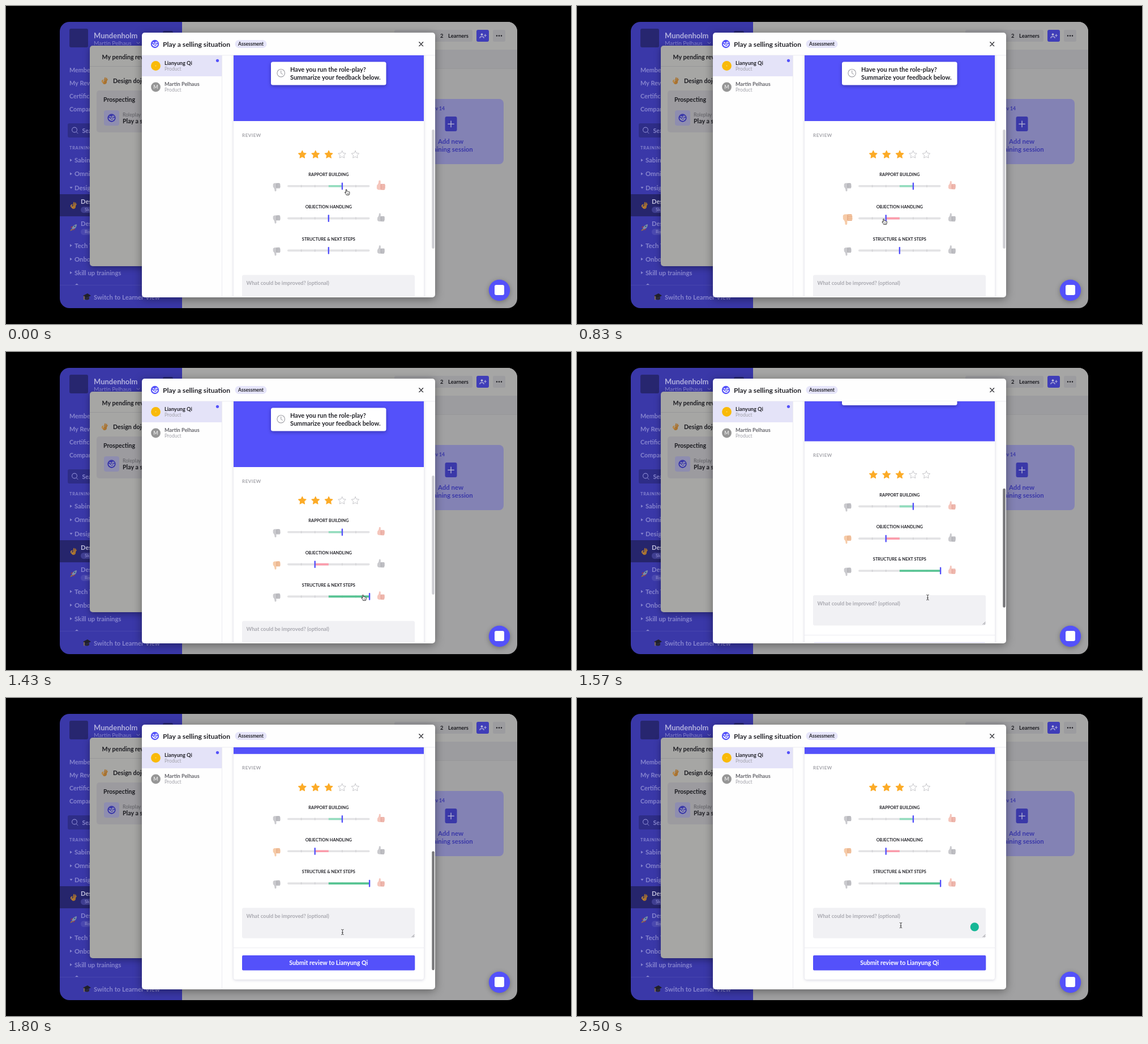
Recreate the animation shown at these times as an HTML page with a canvas. Size 998 by 561 pixels, loop 2530 ms.

```html
<!DOCTYPE html>
<html lang="en">
<head>
<meta charset="utf-8">
<title>Role-play review</title>
<style>
  html, body { margin: 0; width: 100%; height: 100%; overflow: hidden; background: #000; }
  canvas { display: block; }
</style>
</head>
<body>
<canvas id="stage" width="998" height="561"></canvas>
<script>
const ctx = document.getElementById('stage').getContext('2d');
const LOOP = 2530;
const BLUE = '#5451fa', INK = '#232329', DIM_BLUE = '#3a38a8', DIM_INK = '#1b1b20';
const LEARNER = 'Lianyung Qi', COACH = 'Martin Pelhaus', COMPANY = 'Mundenholm';

const clamp = v => Math.max(0, Math.min(1, v));
const smooth = v => (1 - Math.cos(Math.PI * clamp(v))) / 2;

function box(x, y, w, h, color, r = 0) {
  ctx.fillStyle = color;
  ctx.beginPath();
  ctx.roundRect(x, y, w, h, r);
  ctx.fill();
}

function disc(x, y, r, color) {
  ctx.fillStyle = color;
  ctx.beginPath();
  ctx.arc(x, y, r, 0, Math.PI * 2);
  ctx.fill();
}

// y is the middle of the capital letters
function text(str, x, y, size, color, { weight = 700, align = 'left', spacing = 0 } = {}) {
  ctx.font = `${weight} ${size}px Lato, sans-serif`;
  ctx.textAlign = align;
  ctx.letterSpacing = spacing + 'px';
  ctx.fillStyle = color;
  ctx.fillText(str, x, y + size * 0.36);
}

function stroke(d, color, width = 1) {
  ctx.strokeStyle = color;
  ctx.lineWidth = width;
  ctx.lineCap = ctx.lineJoin = 'round';
  ctx.stroke(new Path2D(d));
}

function shape(d, color) {
  ctx.fillStyle = color;
  ctx.fill(new Path2D(d));
}

function at(x, y, draw, scale = 1) {
  ctx.save();
  ctx.translate(x, y);
  ctx.scale(scale, scale);
  draw();
  ctx.restore();
}

function shadowed(blur, color, dy, draw) {
  ctx.save();
  ctx.shadowBlur = blur;
  ctx.shadowColor = color;
  ctx.shadowOffsetY = dy;
  draw();
  ctx.restore();
}

function playIcon(x, y, color, mark) {
  disc(x, y, 7.2, color);
  at(x, y, () => {
    stroke('M-4.3 .5Q-2.5 5 2 3.6Q3.8 2.8 4.4 .6', mark, 1.7);
    stroke('M-3.2 -2.6L-1.4 -1.6M1 -2.2Q2.4 -4 4 -2.6', mark, 1.6);
    stroke('M-1 1L2.5 0', mark, 1.5);
  });
}

function okHand(x, y) {
  at(x, y, () => {
    stroke('M0 -1L1 -5.4M2 -1L3.6 -4.6M3.2 .4L5 -2.6', '#a8722f', 1.8);
    shape('M-2 1L4 -1.4L4 3Q3 6 0 6Q-3 6 -3 3Z', '#a8722f');
    stroke('M-1 3A2.2 2.2 0 1 1 -2.6 -1.2', '#b98238', 1.8);
  });
}

function rocket(x, y) {
  at(x, y, () => {
    shape('M6 -6Q0 -5 -3 1L0 4Q6 0 6 -6Z', '#7d8ea8');
    shape('M-1 -3L-5 -1L-3 1ZM3 1L1 5L-1 3Z', '#983848');
    shape('M-3 2L-6 6L-1 4Z', '#aa7930');
    disc(2.3, -2.2, 1.3, '#2e5a95');
  });
}

function gradCap(x, y) {
  at(x, y, () => {
    shape('M-7 -2L1 -6L7 -2L-1 2Z', '#20202b');
    shape('M-4 0L-1 2L4 0L4 4Q0 7 -4 4Z', '#282833');
    stroke('M-5 -1L-5 5', '#a38334', 1.2);
  });
}

function drawSidebar() {
  const pale = '#8785cf', bright = '#b2b1dd';
  box(95, 28, 216, 505, DIM_BLUE);
  box(112, 40, 33, 33, '#27266f', 3);
  text(COMPANY, 155, 52, 13, bright);
  text(COACH, 155, 65, 10.1, pale, { weight: 400 });
  stroke('M231 64L233.5 66.5L236 64', pale);
  box(277, 44, 18, 18, '#27266f', 3);

  ['Members', 'My Reviews', 'Certificates', 'Company'].forEach((s, i) =>
    text(s, 112, 113.5 + i * 23, 10.8, pale));

  box(109, 207, 186, 25, '#2e2d87', 3);
  ctx.strokeStyle = pale;
  ctx.lineWidth = 1.1;
  ctx.beginPath();
  ctx.arc(121, 218.5, 4.4, 0, 7);
  ctx.stroke();
  stroke('M124.3 222L127 224.8', pale);
  text('Search', 134.5, 220, 10.6, pale);
  text('TRAININGS', 112, 250, 7.4, pale, { spacing: 0.7 });

  box(95, 332, 216, 39, '#26256c');
  const rows = [['Sabine', 272], ['Omnichannel', 296], ['Design', 320.5],
    ['Tech Talks', 422.5], ['Onboarding', 446.5], ['Skill up trainings', 470.5]];
  for (const [label, y] of rows) {
    shape(label === 'Design'
      ? `M112.5 ${y - 1.5}h5l-2.5 3.5z`
      : `M113 ${y - 2.5}v5l3.8 -2.5z`, pale);
    text(label, 121, y, 11.3, pale);
  }
  okHand(119, 352);
  text('Design dojo', 132, 345, 11.2, '#c2c1de');
  box(132, 354, 40, 11, '#403f92', 5.5);
  text('Skills', 139, 359.5, 8, pale);
  rocket(119, 391);
  text('Design sprint', 132, 384, 11.2, pale);
  box(132, 393, 46, 11, '#4b49b0', 5.5);
  text('Role', 139, 398.5, 8, pale);

  shape('M122 492L125 489.5L128 492Z', pale);
  box(95, 492, 216, 1, '#4745ae');
  gradCap(143, 513);
  text('Switch to Learner View', 155, 513.5, 11.3, pale);
}

function drawDesk() {
  box(311, 28, 592, 505, '#a1a1a2');
  box(311, 28, 592, 49, '#a6a6a5');
  box(311, 77, 592, 33, '#9c9c9f');
  box(311, 110, 592, 1, '#979799');
  box(686, 42, 138, 21, '#9c9c9f', 3);
  text('2', 767, 53, 9.3, DIM_INK);
  text('Learners', 781, 53, 9.4, DIM_INK);
  box(831, 42, 22, 21, '#3f3db8', 3);
  disc(840.5, 50.2, 1.9, '#b9b8dc');
  stroke('M837 56.5Q837 53.8 840.5 53.8Q844 53.8 844 56.5', '#b9b8dc', 1.2);
  stroke('M846.5 50v4M844.5 52h4', '#b9b8dc');
  box(860, 42, 22, 21, '#9c9c9f', 3);
  [867, 871, 875].forEach(x => disc(x, 52.5, 1.2, DIM_INK));

  box(692, 164, 187, 115, '#8382b4', 8);
  text('Nov 14', 775, 181, 8.6, DIM_BLUE, { align: 'right' });
  box(775.5, 195, 21, 26, DIM_BLUE, 3);
  stroke('M786 203v10.5M780.8 208.3h10.4', '#a9a8cf', 1.5);
  text('Add new', 785.5, 238.5, 11.4, DIM_BLUE, { align: 'center' });
  text('training session', 785.5, 252.5, 11.4, DIM_BLUE, { align: 'center' });
}

function drawPending() {
  shadowed(12, 'rgba(0,0,0,.35)', 3, () => box(148, 70, 500, 389, '#a6a6a4', 5));
  text('My pending reviews', 169.5, 90, 10.6, DIM_INK);
  box(148, 106, 100, 1, '#979799');
  okHand(174, 132);
  text('Design dojo', 189, 132.5, 10.7, DIM_INK);
  box(160, 149, 200, 74, '#9c9b9f', 5);
  text('Prospecting', 172, 165, 10.6, DIM_INK);
  box(173, 184, 27, 27, '#8e8db0', 4);
  playIcon(186.5, 197.5, DIM_BLUE, '#a6a6b8');
  text('Roleplay', 206, 191.5, 8.7, '#606065', { weight: 400 });
  text('Play a selling situation', 206, 203.5, 10.6, DIM_INK);
}

function drawChatButton() {
  shadowed(9, 'rgba(0,0,0,.3)', 2, () => disc(871.5, 501.5, 18.7, BLUE));
  box(863, 492, 17, 18, '#fff', 3);
}

function drawModalFrame() {
  shadowed(16, 'rgba(0,0,0,.4)', 3, () => box(240, 47, 518, 467, '#fefefe', 5));
  playIcon(263, 67, BLUE, '#fff');
  text('Play a selling situation', 277, 68, 12.1, INK);
  box(404.5, 60, 56, 14, '#e6e5fa', 7);
  text('Assessment', 432.5, 67, 8.5, INK, { align: 'center' });
  stroke('M729.8 63.8l6.8 6.8M736.6 63.8l-6.8 6.8', INK, 1.3);
  box(240, 86.5, 518, 1, '#eeeef2');

  box(240, 87, 141, 37, '#e4e3f8');
  disc(264.5, 105.5, 8.4, '#f9ba08');
  disc(264.5, 105.5, 1.1, '#fbd65c');
  text(LEARNER, 280, 100.5, 9.2, INK);
  text('Product', 280, 111, 8.6, '#a2a2aa', { weight: 400 });
  disc(373.5, 96.3, 2.6, BLUE);
  disc(264.5, 143, 8.4, '#969696');
  text(COACH[0], 264.5, 143, 9, '#e2e2e2', { align: 'center' });
  text(COACH, 280, 138, 9.2, '#66666c');
  text('Product', 280, 148, 8.6, '#a2a2aa', { weight: 400 });
  box(381, 87, 1, 427, '#ebebf1');
}

function star(x, y, filled) {
  ctx.beginPath();
  for (let i = 0; i < 10; i++) {
    const a = -Math.PI / 2 + i * Math.PI / 5, r = i % 2 ? 3.5 : 7.1;
    ctx.lineTo(x + r * Math.cos(a), y + 0.5 + r * Math.sin(a));
  }
  ctx.closePath();
  ctx.lineJoin = 'round';
  ctx.lineWidth = filled ? 1.2 : 1;
  ctx.strokeStyle = filled ? '#fcab27' : '#c6c6ca';
  ctx.fillStyle = '#fcab27';
  if (filled) ctx.fill();
  ctx.stroke();
}

function thumb(x, y, up, scale, active) {
  const [skin, line] = active
    ? (up ? ['#f5c6bc', '#e39b91'] : ['#f6cba8', '#e3a57e'])
    : ['#cacace', '#a9a9ae'];
  ctx.save();
  ctx.translate(x, y);
  ctx.scale(scale, up ? scale : -scale);
  shape('M-6.2 0Q-4 -2 -3.6 -4.5L-3.4 -7Q-2 -8.6 -.6 -7L-.4 -2L5 -2Q6.6 -1.8 6.6 0L6.2 5.5Q5.8 7 4 7L-4 6.6Q-6.4 5.8 -6.4 4Z', skin);
  stroke('M.4 -1.7H5.6M.2 .8H6M.2 3.2H6M.4 5.6H5.2M0 -1.5V5.6', line, 0.9);
  ctx.restore();
}

const sliders = [
  { label: 'RAPPORT BUILDING', y: 317.7, value: 1, start: -210 },
  { label: 'OBJECTION HANDLING', y: 374.5, value: -1, start: 690 },
  { label: 'STRUCTURE & NEXT STEPS', y: 431.3, value: 3, start: 1160 },
];

function drawSlider({ label, y, value, start }, t) {
  const mid = 569.8, step = 24.1;
  const progress = smooth((t - start) / 80);
  const pop = 1 + 0.3 * Math.sin(Math.PI * clamp((t - start) / 260));
  const handle = mid + value * step * progress;
  const active = t >= start;
  text(label, mid, y - 20.3, 7.4, INK, { align: 'center' });
  box(497, y - 1.7, 145.5, 3.6, '#e3e3e5', 1.8);
  [-2, -1, 1, 2].forEach(n => box(mid + n * step - 0.8, y - 1.9, 1.6, 4, '#d3d3d6'));
  const fill = value < 0 ? '#fb9cab' : value > 2 ? '#57c493' : '#92dcbd';
  box(Math.min(mid, handle), y - 1.7, Math.abs(handle - mid), 3.6, fill);
  box(handle - 1.2, y - 6.3, 2.4, 12.8, BLUE, 1);
  const liked = active && value > 0, disliked = active && value < 0;
  thumb(478, y + 1.5, false, disliked ? pop : 1, disliked);
  thumb(662.3, y - 1.2, true, liked ? pop : 1, liked);
}

const caretOn = t => t >= 2000 && t < 2490;

function drawReview(t, scroll) {
  ctx.save();
  ctx.beginPath();
  ctx.rect(382, 87, 375, 426);
  ctx.clip();
  ctx.translate(0, -scroll);
  shadowed(5, 'rgba(60,60,110,.22)', 1, () => box(402, 60, 336, 541, '#fff', 4));
  box(402, 60, 336, 143, BLUE);
  shadowed(6, 'rgba(0,0,50,.35)', 2, () => box(468, 98.5, 203.5, 41, '#fff', 3.5));
  ctx.strokeStyle = '#a3a3a9';
  ctx.lineWidth = 1.2;
  ctx.beginPath();
  ctx.arc(485.7, 118.3, 6.8, 0, 7);
  ctx.stroke();
  stroke('M485.7 114v4.6l2.8 1.8', '#a3a3a9', 1.1);
  text('Have you run the role-play?', 502, 112.5, 10.9, INK);
  text('Summarize your feedback below.', 502, 126.5, 10.9, INK);

  text('REVIEW', 417, 227.8, 8, '#a2a2a8', { spacing: 0.5 });
  for (let i = 0; i < 5; i++) star(523.3 + i * 23.4, 261.8, i < 3);
  sliders.forEach(s => drawSlider(s, t));

  box(417, 474.5, 305, 53.5, '#f1f1f4', 3);
  text('What could be improved? (optional)', 424.5, 489, 9.25, '#a9a9b0');
  stroke('M717 526l4 -4M719.5 526l1.5 -1.5', '#77777c', 0.9);
  if (caretOn(t)) box(424.4, 482, 1, 12, '#222');
  ctx.globalAlpha = smooth((t - 2280) / 100);
  disc(702.3, 508.2, 7.6, '#16b796');
  ctx.globalAlpha = 1;

  box(402, 544.5, 336, 1, '#ececf1');
  box(417, 558.3, 305.3, 26.4, BLUE, 2);
  text('Submit review to ' + LEARNER, 569.7, 571.7, 10.6, '#fff', { align: 'center' });
  ctx.restore();
}

function drawScrollbar(t, scroll) {
  const y = 218 + scroll / 2;
  box(752.3, y, 4.4, 210, '#cfcfd3', 2.2 * (t < 1800));
  if (t >= 1800) box(752, y - 1, 5, 212, '#fefefe');
  ctx.globalAlpha = smooth((t - 1460) / 40) * (1 - smooth((t - 1860) / 180));
  box(752.3, y, 4.4, 210, '#77777a', 2.2);
  ctx.globalAlpha = 1;
}

const path = [
  { t: 0, x: 602.5, y: 328 }, { t: 130, x: 602.5, y: 328 },
  { t: 640, x: 543, y: 380, ease: true }, { t: 870, x: 543, y: 380 },
  { t: 1130, x: 640, y: 433, ease: true }, { t: 1340, x: 640, y: 433 },
  { t: 1430, x: 632, y: 433 }, { t: 1570, x: 619.5, y: 433 },
  { t: 1800, x: 594.5, y: 413 }, { t: 1960, x: 572, y: 401 }, { t: LOOP, x: 572, y: 401 },
];

function pointerAt(t) {
  const i = path.findIndex(k => k.t > t);
  const a = path[i - 1], b = path[i];
  const u = (t - a.t) / (b.t - a.t);
  const p = b.ease ? smooth(u) : u;
  return { x: a.x + (b.x - a.x) * p, y: a.y + (b.y - a.y) * p };
}

function outlined(d) {
  shape(d, '#fff');
  stroke(d, '#222', 0.9);
}

function drawPointer(t, scroll) {
  const { x, y } = pointerAt(t);
  const docY = y + scroll;
  at(x, y, () => {
    if (docY > 474) {
      stroke('M-1.8 -4.6Q0 -4.6 0 -3.4V3.4Q0 4.6 -1.8 4.6M1.8 -4.6Q0 -4.6 0 -3.4M0 3.4Q0 4.6 1.8 4.6M-1 .9H1', '#333', 0.9);
    } else if (sliders.some(s => Math.abs(docY - s.y) < 13)) {
      outlined('M-2.2 .8V-4Q-1.4 -5.6 -.6 -4V-1Q.5 -2 1.2 -.8Q2.3 -1.5 2.9 -.3Q4.4 -.7 4.4 1V2.6Q4 4 3.4 5.4H-1.2Q-2 3.6 -4 1.2Q-4.4 -.6 -2.2 .8Z');
      stroke('M.4 2v1.8M2.2 2v1.8', '#222', 0.6);
    } else {
      outlined('M-3 -5.5V4L-.8 2L.8 5.5L2.3 4.8L.8 1.5H3.8Z');
    }
  });
}

function render(t) {
  ctx.fillStyle = '#000';
  ctx.fillRect(0, 0, 998, 561);
  const scroll = 104.3 * smooth((t - 1470) / 220);
  ctx.save();
  ctx.beginPath();
  ctx.roundRect(95, 28, 808, 505, 17);
  ctx.clip();
  drawDesk();
  drawSidebar();
  drawPending();
  drawModalFrame();
  drawReview(t, scroll);
  drawScrollbar(t, scroll);
  drawChatButton();
  ctx.restore();
  drawPointer(t, scroll);
}

const begin = performance.now();
function tick() {
  render((performance.now() - begin) % LOOP);
  requestAnimationFrame(tick);
}
tick();
</script>
</body>
</html>
```
